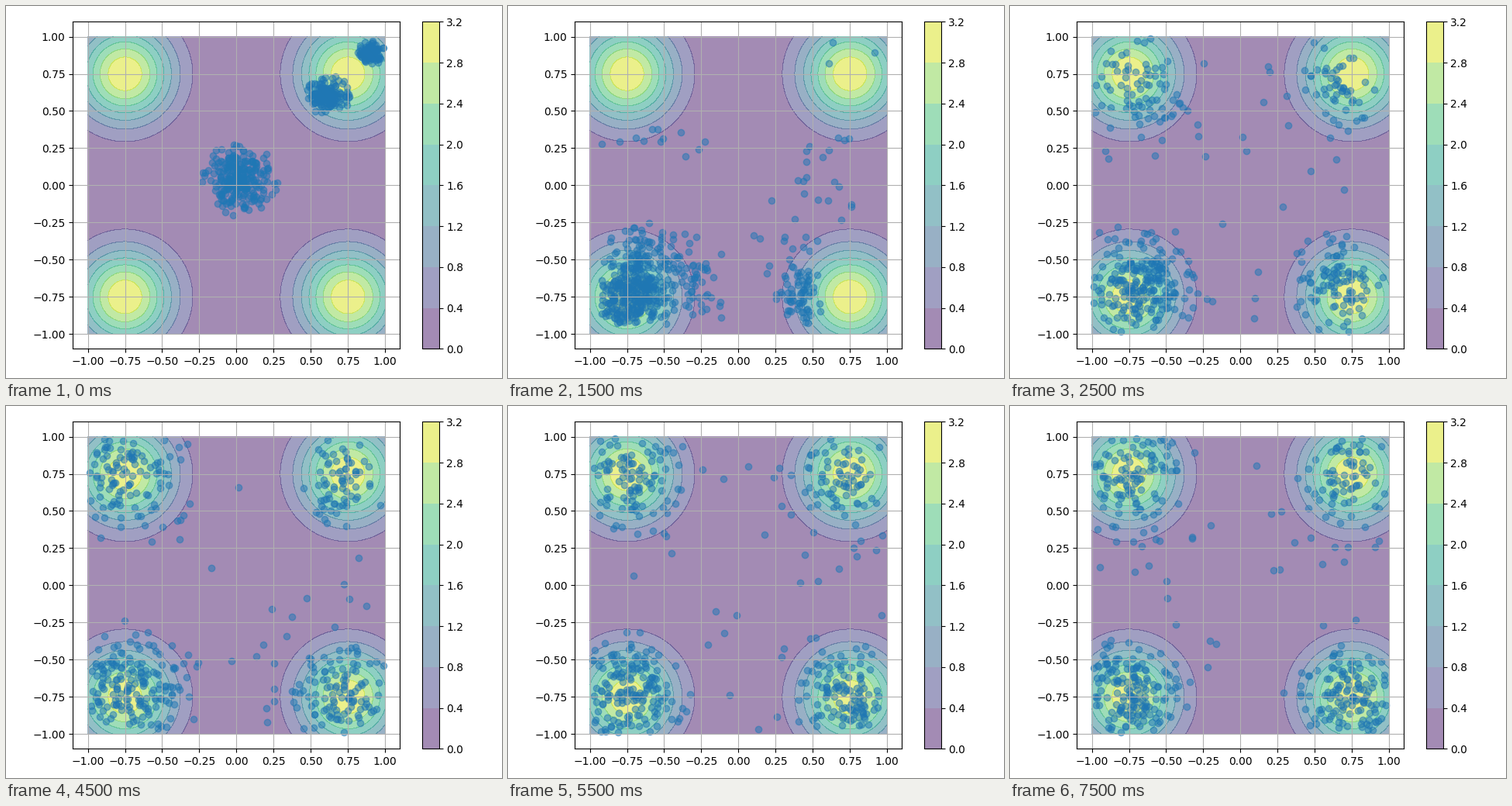
Write a matplotlib script that moves like this. It is 640 by 480 pixels and loops after 8000 ms.

```python
import numpy as np
import matplotlib.pyplot as plt
from matplotlib.animation import FuncAnimation

W, H, DPI = 640, 480, 100
VARIANCE = 0.05
REACH = 2.35  # cluster radius in standard deviations


def density(x, y):
    """Four equal Gaussian bumps, one in each quadrant."""
    total = 0
    for cx in (-0.75, 0.75):
        for cy in (-0.75, 0.75):
            r2 = (x - cx) ** 2 + (y - cy) ** 2
            total = total + np.exp(-r2 / (2 * VARIANCE))
    return total / (2 * np.pi * VARIANCE)


def cluster(rng, n, cx, cy, sx, sy, edge=0.99):
    """n Gaussian points, kept near their centre and inside the square."""
    z = rng.normal(size=(n * 6, 2))
    z = z[np.hypot(z[:, 0], z[:, 1]) < REACH]
    points = z * (sx, sy) + (cx, cy)
    return points[(np.abs(points) < edge).all(axis=1)][:n]


def strays(rng, n):
    """n lone points between the bumps, more of them close to a bump."""
    points = rng.uniform(-0.98, 0.98, size=(4000, 2))
    level = density(*points.T)
    keep = (level < 0.4) & (rng.random(4000) < level + 0.04)
    return points[keep][:n]


def start(rng):
    """Three tight groups on the diagonal."""
    return [cluster(rng, 250, 0.02, 0.04, 0.115, 0.105),
            cluster(rng, 150, 0.615, 0.6, 0.068, 0.06),
            cluster(rng, 100, 0.905, 0.895, 0.038, 0.036)]


def scatter_out(rng):
    """The groups drift apart towards the lower left."""
    return [cluster(rng, 210, -0.62, -0.62, 0.17, 0.17),
            cluster(rng, 110, -0.35, -0.4, 0.2, 0.2),
            cluster(rng, 90, 0.3, -0.55, 0.14, 0.17),
            cluster(rng, 50, 0.35, 0.1, 0.25, 0.25)]


def gather(rng):
    """Most points fill the lower left bump, a few lag behind."""
    return [cluster(rng, 310, -0.72, -0.73, 0.135, 0.13, 0.93),
            cluster(rng, 60, -0.64, -0.44, 0.13, 0.1, 0.93),
            cluster(rng, 65, -0.35, -0.62, 0.13, 0.18, 0.93),
            cluster(rng, 65, 0.4, -0.76, 0.075, 0.105, 0.93),
            cluster(rng, 15, 0.33, -0.42, 0.14, 0.12),
            cluster(rng, 12, -0.55, 0.31, 0.19, 0.08),
            cluster(rng, 8, 0.5, 0.3, 0.17, 0.08),
            cluster(rng, 12, 0.45, -0.12, 0.25, 0.1),
            rng.uniform(0.6, 0.97, size=(3, 2))]


def settle(step):
    """All four bumps hold points; the groups widen slowly with time."""
    age = step - 3
    centre = 0.74 - 0.07 * 0.6 ** age
    spread = 0.18 - 0.012 * 0.5 ** age
    left = 100 if age else 75
    right = 70 if age else 50
    low_left = 160 + 50 * 0.3 ** age
    low_right = 95 + 6 * age

    def build(rng):
        sizes = [left, right, int(low_left), low_right]
        spots = [(-1, 1), (1, 1), (-1, -1), (1, -1)]
        parts = [cluster(rng, n, centre * sx, centre * sy,
                         spread * (0.95 - 0.05 * sx),
                         spread * (0.95 - 0.05 * sx))
                 for n, (sx, sy) in zip(sizes, spots)]
        return parts + [strays(rng, 34)]

    return build


def add_box(left, top, right, bottom):
    """Axes placed by stage pixels."""
    return fig.add_axes([left / W, 1 - bottom / H,
                         (right - left) / W, (bottom - top) / H])


steps = [start, scatter_out, gather] + [settle(k) for k in range(3, 9)]
clouds = [np.vstack(make(np.random.default_rng(40 + k)))
          for k, make in enumerate(steps)]

fig = plt.figure(figsize=(W / DPI, H / DPI), dpi=DPI)
ax = add_box(86.4, 20.4, 508.4, 442.4)
bar = add_box(537.4, 20.4, 558.5, 442.4)

side = np.linspace(-1, 1, 100)
gx, gy = np.meshgrid(side, side)
field = ax.contourf(gx, gy, density(gx, gy),
                    levels=np.linspace(0, 3.2, 9), alpha=0.5)
fig.colorbar(field, cax=bar)

dots = ax.scatter(*clouds[0].T, color="C0", alpha=0.5)
ticks = np.linspace(-1, 1, 9)
ax.set(xlim=(-1.1, 1.1), ylim=(-1.1, 1.1), xticks=ticks, yticks=ticks)
ax.grid(True)


def update(i):
    # the first and last clouds last half as long as the others
    dots.set_offsets(clouds[(i + 1) // 2])
    return (dots,)


anim = FuncAnimation(fig, update, frames=16, interval=500,
                     repeat=True, repeat_delay=0)
plt.show()
```
